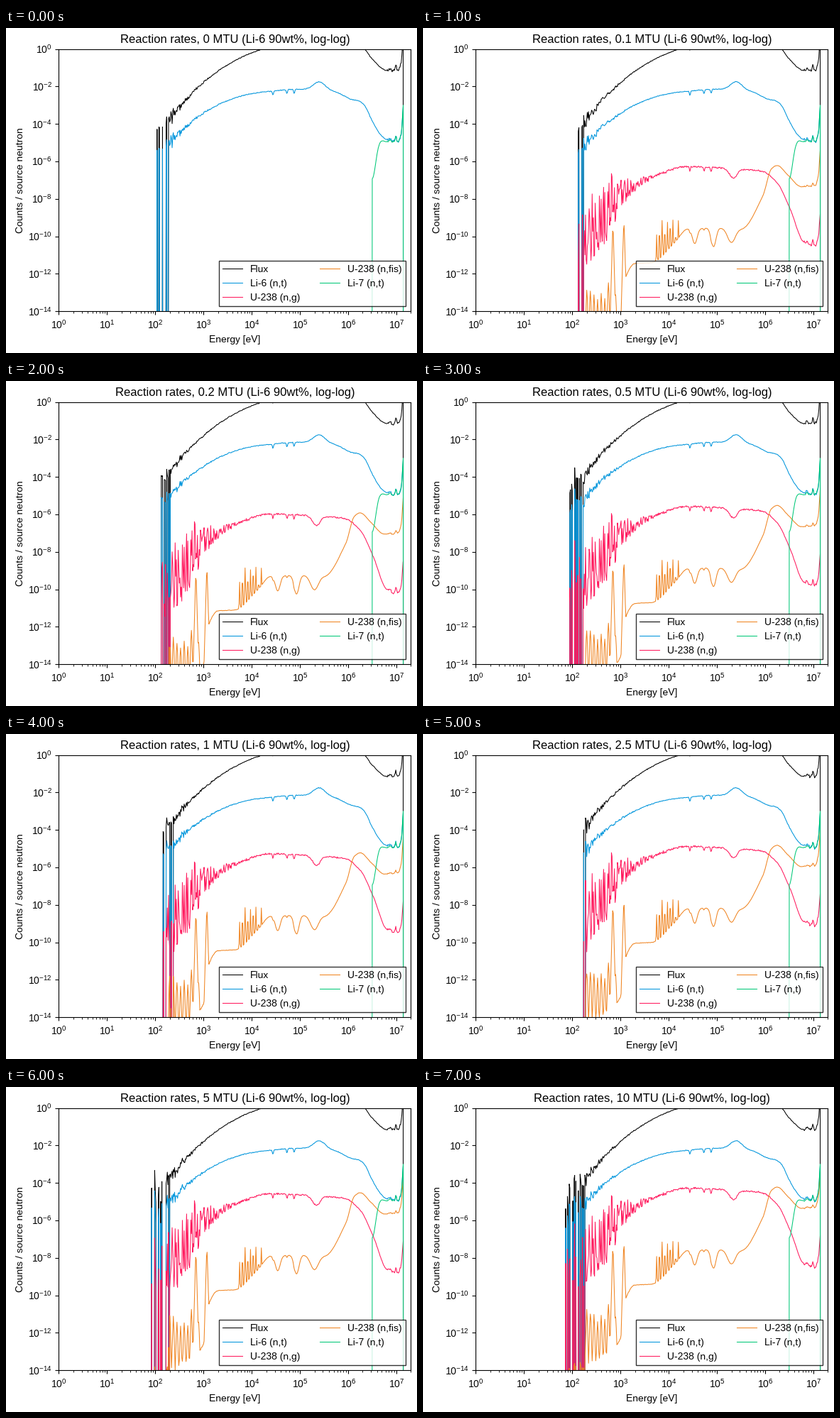
Write a matplotlib script that moves like this. It is 579 px wide and 458 px high and loops after 8000 ms.

```python
import numpy as np
import matplotlib.pyplot as plt
from matplotlib.animation import FuncAnimation
from matplotlib.ticker import NullLocator

W, H, DPI = 579, 458, 100
LEFT, TOP, AX_W, AX_H = 74.4, 29.6, 496, 369.6
STEP, END = 0.0125, 7.141  # bin width and source energy, log10 eV
EMPTY = -40  # log10 rate of a bin without counts

plt.rcParams.update({"font.family": "Liberation Sans",
                     "text.hinting": "default"})

# Uranium mass, log10 energy of the first count and of full coverage.
STEPS = [(0, 2.04, 2.28), (0.1, 2.12, 2.25), (0.2, 2.13, 2.31),
         (0.5, 1.95, 2.23), (1, 2.16, 2.38), (2.5, 2.24, 2.27),
         (5, 1.92, 2.30), (10, 1.86, 2.25)]

SERIES = [("Flux", "#000000"), ("Li-6 (n,t)", "#0095dc"),
          ("U-238 (n,g)", "#ff1a5e"), ("U-238 (n,fis)", "#f08522"),
          ("Li-7 (n,t)", "#00c878")]

u = np.append(np.arange(1.8, END, STEP), END)  # log10 energy


def smooth(*points):
    """Monotone cubic through a few (log energy, log rate) points."""
    x, y = np.array(points).T
    h = np.diff(x)
    s = np.diff(y) / h
    a, b = s[:-1], s[1:]
    same = a * b > 0
    inner = np.where(same, 2 * a * b / np.where(same, a + b, 1), 0)
    m = np.concatenate([s[:1], inner, s[-1:]])
    i = np.clip(np.searchsorted(x, u) - 1, 0, len(h) - 1)
    t = (u - x[i]) / h[i]
    return (y[i] + t * t * (3 - 2 * t) * (y[i + 1] - y[i])
            + h[i] * t * (1 - t) * ((1 - t) * m[i] - t * m[i + 1]))


def bump(center, height, width):
    return height * np.exp(-((u - center) / width) ** 2 / 2)


def add_peaks(y, centers, tops, slope):
    for c, top in zip(centers, tops):
        y = np.maximum(y, top - slope * np.maximum(abs(u - c) - 0.006, 0))
    return y


rng = np.random.default_rng(11)

# Scattering dips and source bumps show in every reaction.
shared = (sum(bump(c, -0.22, 0.012) for c in (4.44, 4.73, 4.88))
          + bump(6.87, 0.1, 0.02) + bump(6.99, 0.3, 0.012))

flux = shared + smooth(
    (1.8, -4.75), (2.28, -3.8), (2.59, -2.8), (3.32, -1.15), (3.91, -0.3),
    (4.4, 0.14), (5, 0.57), (5.7, 0.83), (6.12, 0.45), (6.35, -0.02),
    (6.49, -0.51), (6.81, -1.15), (7.03, -1.15), (7.1, -0.7), (END, 0.8))

# 1/v absorption with a resonance near 250 keV.
li6 = (flux - 1.25 - 0.54 * (u - 2.28)
       + bump(5.4, 0.42, 0.12) + bump(6.33, 0.42, 0.15))

# Threshold reaction: a steep onset, then parallel to the flux.
onset = 6.492
li7 = np.where(u < onset, EMPTY,
               flux - 3.8 - 2.6 * np.exp(-((u - onset) / 0.11) ** 2))

capture = shared + bump(5.34, -0.5, 0.08) + smooth(
    (1.8, -10.9), (2.36, -9.4), (3.05, -7.35), (3.76, -6.42), (4.4, -5.97),
    (5.1, -6.05), (5.9, -6.2), (6.25, -6.85), (6.52, -8.25), (6.8, -10),
    (7.03, -10.2), (7.1, -9.75), (END, -8.5))
spread = np.minimum(1, np.exp(-(u - 2.8) / 0.3)) + 0.02 * (u < 6.1)
capture += rng.uniform(-1.7, 1.7, u.size) * spread

fission = (shared / 2 + bump(4.54, -0.8, 0.05) + bump(4.93, -1, 0.05)
           + bump(5.3, -0.75, 0.08))
fission += smooth(
    (1.8, -16), (2.81, -14.6), (3.0, -14), (3.09, -12), (3.3, -11.15),
    (3.65, -11.1), (4.1, -10.1), (4.4, -9.3), (5.1, -9.25), (5.5, -9.3),
    (5.95, -7.55), (6.13, -6.1), (6.25, -5.92), (6.48, -6.45), (6.75, -7.05),
    (7.03, -7), (7.1, -6.5), (END, -5.1))
fission = add_peaks(fission, np.arange(2.3, 2.95, 0.075),
                    rng.uniform(-13.6, -12, 9), 90)
fission = add_peaks(fission, (2.843, 3.071), (-9.4, -9.1), 90)
fission = add_peaks(fission, np.linspace(3.75, 4.2, 9),
                    rng.uniform(-9.9, -8.8, 9), 180)

noise_level = 0.01 + 0.3 * np.exp(-(u - 2.2) / 0.3) + 0.03 * (u > 6.8)


def curves(step):
    mass, first, full = STEPS[step]
    rng = np.random.default_rng(40 + step)
    noise = rng.normal(0, 1, u.size).clip(-2, 2) * noise_level
    noise[-1] = 0
    sparse = (u > first) & (rng.random(u.size) < 0.45)
    live = (u >= full) | sparse | (abs(u - first) < STEP / 2)
    lift = np.log10(mass / 0.2) if mass else EMPTY
    ys = (flux + noise, li6 + noise, capture + noise + lift,
          fission + noise / 2 + lift, li7 + noise / 2)
    return [np.where(live, y, EMPTY) for y in ys]


fig = plt.figure(figsize=(W / DPI, H / DPI), dpi=DPI, facecolor="white")
ax = fig.add_axes([LEFT / W, 1 - (TOP + AX_H) / H, AX_W / W, AX_H / H])
ax.set_xscale("log")
ax.set_yscale("log")
ax.set_xlim(1, 2e7)
ax.set_ylim(1e-14, 1)
ax.set_yticks(10.0 ** np.arange(-14, 1, 2))
ax.yaxis.set_minor_locator(NullLocator())
ax.tick_params(axis="x", pad=5.3)
ax.set_xlabel("Energy [eV]")
ax.set_ylabel("Counts / source neutron", labelpad=2.5)
title = ax.set_title("", pad=6.5)
lines = [ax.plot([], [], color=color, lw=0.75, label=name)[0]
         for name, color in SERIES]
ax.legend(loc="lower right", ncols=2, fancybox=False, edgecolor="black")


def draw(step):
    title.set_text(f"Reaction rates, {STEPS[step][0]:g} MTU "
                   "(Li-6 90wt%, log-log)")
    energy = 10 ** np.append(u, END)
    for line, y in zip(lines, curves(step)):
        line.set_data(energy, 10 ** np.append(y, EMPTY))
    return [title, *lines]


anim = FuncAnimation(fig, draw, frames=len(STEPS), interval=1000, repeat=True,
                     repeat_delay=0, blit=False)
plt.show()
```
